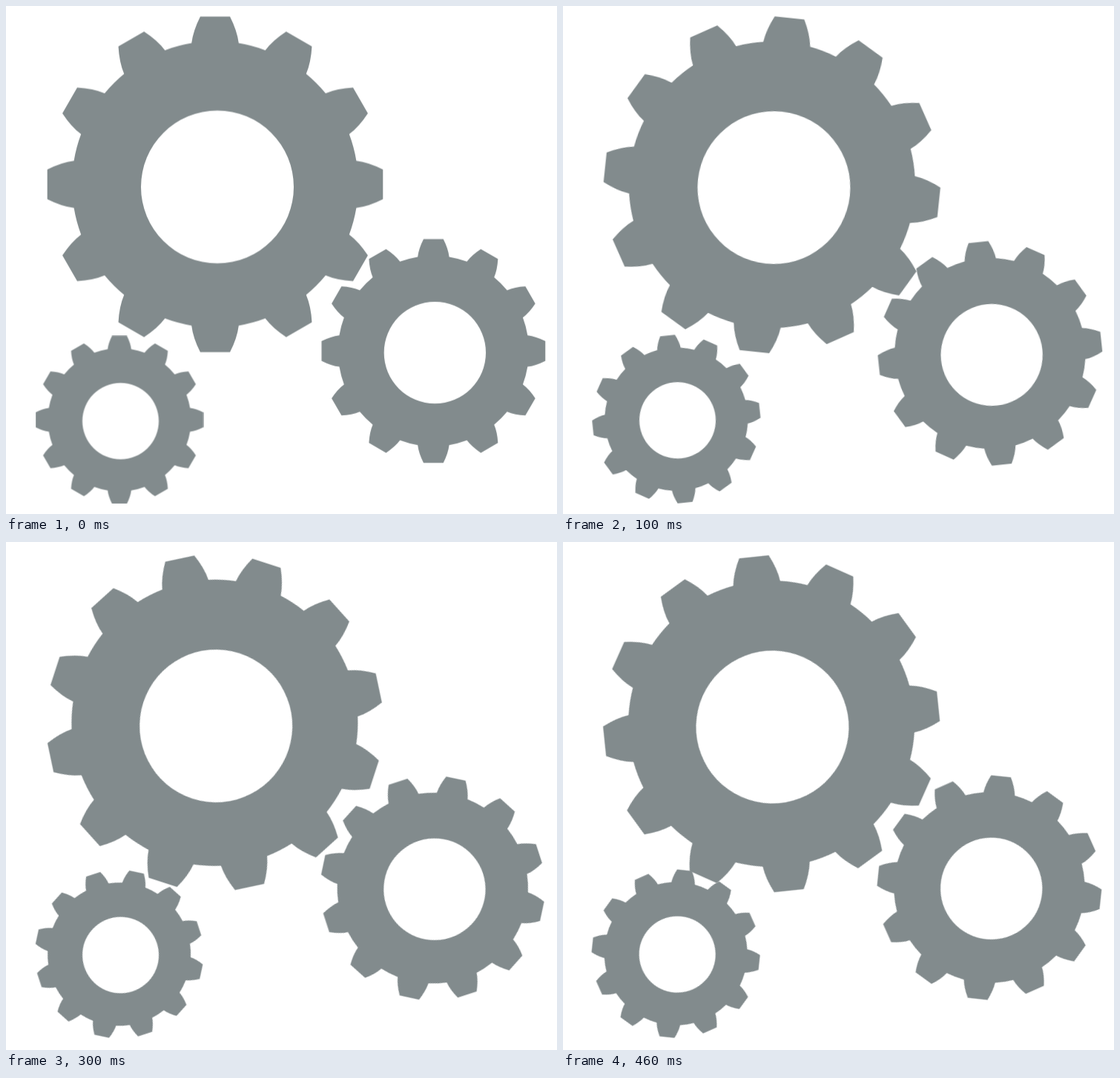
An HTML page that plays this animation: 743 by 685 pixels, repeating every 0.5 s.

```html
<!DOCTYPE html>
<html lang="en">
<head>
<meta charset="utf-8">
<title>Gears</title>
<style>
  html, body { margin: 0; width: 100%; height: 100%; overflow: hidden; background: #fff; }
  svg { display: block; width: 743px; height: 685px; }
  path { fill: #828b8d; fill-rule: evenodd; animation: .5s step-end infinite; }
  #small { animation-name: small; }
  #medium { animation-name: medium; }
  #large { animation-name: large; }

  /* Each gear turns 6deg per step and wobbles a little around its axle. */
  @keyframes large {
    0%   { transform: translate(282px, 240.5px); }
    20%  { transform: translate(281.8px, 241.1px) rotate(6deg); }
    40%  { transform: translate(281.7px, 242.4px) rotate(12deg); }
    60%  { transform: translate(281.4px, 243.8px) rotate(18deg); }
    80%, 100% { transform: translate(281.1px, 245.1px) rotate(24deg); }
  }
  @keyframes medium {
    0%   { transform: translate(576.4px, 465.1px) scale(.6667); }
    20%  { transform: translate(575.9px, 468.4px) scale(.6667) rotate(-6deg); }
    40%  { transform: translate(575.5px, 467.5px) scale(.6667) rotate(-12deg); }
    60%  { transform: translate(575.3px, 466.7px) scale(.6667) rotate(-18deg); }
    80%, 100% { transform: translate(574.9px, 466px) scale(.6667) rotate(-24deg); }
  }
  @keyframes small {
    0%   { transform: translate(153px, 558px) scale(.5); }
    20%  { transform: translate(152.8px, 557.1px) scale(.5) rotate(-6deg); }
    40%  { transform: translate(152.8px, 556.5px) scale(.5) rotate(-12deg); }
    60%  { transform: translate(152.6px, 555.8px) scale(.5) rotate(-18deg); }
    80%, 100% { transform: translate(152.1px, 555.1px) scale(.5) rotate(-24deg); }
  }
</style>
</head>
<body>
<svg viewBox="0 0 743 685">
  <path id="small"/>
  <path id="medium"/>
  <path id="large"/>
</svg>
<script>
  const TEETH = 12, BODY = 193, HOLE = 103;

  // Point on a tooth that points up, turned to its place on the rim
  const turn = (x, y, a) =>
    (x * Math.cos(a) - y * Math.sin(a)).toFixed(2) + ' ' +
    (x * Math.sin(a) + y * Math.cos(a)).toFixed(2);

  function gear() {
    let d = '';
    for (let i = 0; i < TEETH; i++) {
      const p = (x, y) => turn(x, y, i * 2 * Math.PI / TEETH);
      d += (i ? `A${BODY} ${BODY} 0 0 1 ` : 'M') + p(-31.8, -190.4) +
        `Q${p(-29.8, -207)} ${p(-20, -226.3)}L${p(20, -226.3)}` +
        `Q${p(29.8, -207)} ${p(31.8, -190.4)}`;
    }
    d += `A${BODY} ${BODY} 0 0 1 ${turn(-31.8, -190.4, 0)}Z`;
    // The hole sits slightly off centre
    const arc = `a${HOLE} ${HOLE} 0 1 1 `;
    return d + `M${3 - HOLE} 3.5${arc}${2 * HOLE} 0${arc}${-2 * HOLE} 0Z`;
  }

  const shape = gear();
  document.querySelectorAll('path').forEach(p => p.setAttribute('d', shape));
</script>
</body>
</html>
```
